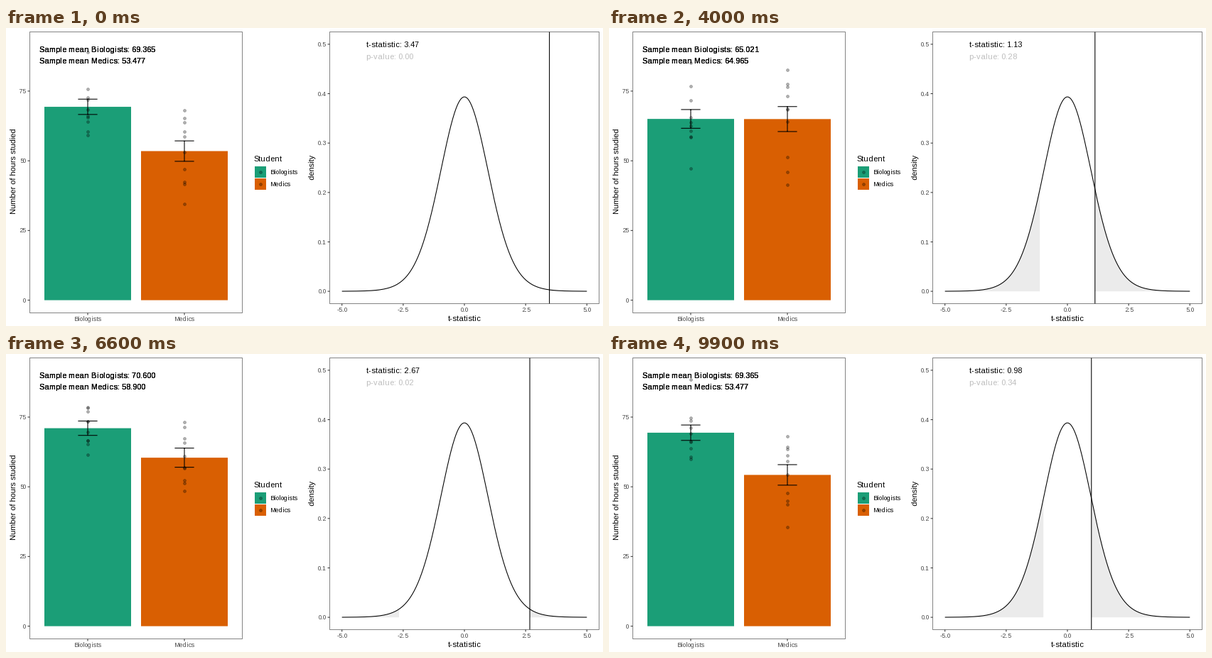
Animation, 840 px wide and 420 px high, one loop 10 s. Source, as a matplotlib script:

```python
import math

import matplotlib.pyplot as plt
import numpy as np
from matplotlib.animation import FuncAnimation
from matplotlib.patches import PathPatch, Rectangle
from matplotlib.path import Path
from matplotlib.textpath import TextPath

W, H, DPI = 840, 420, 60
PT = 72 / DPI  # points per pixel
LINE = 1.07 * PT
FONT = "Liberation Sans"
GREEN, ORANGE = "#1B9E77", "#D95F02"
DARK, TICK_TEXT = "#333333", "#4D4D4D"
NAMES = ("Biologists", "Medics")
CENTERS = (115, 251)
HALF_BAR, HALF_CAP = 61, 13.6
FRAMES, CYCLE, N = 100, 10, 10
DF = 2 * N - 2

plt.rcParams.update({
    "font.family": FONT,
    "path.snap": False,
    "text.hinting_factor": 1,
})

# Each experiment: mean of biologists, mean of medics, t-statistic
EXPERIMENTS = (
    (69.365, 53.477, 3.47), (70.412, 55.397, 3.66),
    (69.093, 54.927, 3.60), (64.600, 58.400, 1.126),
    (65.021, 64.965, 0.01), (70.238, 54.933, 4.15),
    (70.600, 58.900, 2.67), (72.272, 65.063, 1.79),
    (59.645, 59.343, 0.069), (69.950, 65.200, 0.98),
)
SE_SHARE = np.array([0.6, 0.8])  # how the groups split the standard error


def hours_y(v):
    return 383.6 - 3.929 * v


def t_x(t):
    return 645 + 34.46 * t


def density_y(d):
    return 371.1 - 696.4 * d


def t_density(t, df=DF):
    c = math.gamma((df + 1) / 2) / (math.sqrt(df * math.pi) * math.gamma(df / 2))
    return c * (1 + t * t / df) ** (-(df + 1) / 2)


def p_value(t):
    """Two-sided Welch test."""
    df = (N - 1) / np.sum(SE_SHARE ** 4)
    x = np.linspace(0, t, 400)
    d = t_density(x, df)
    return 1 - np.sum((d[1:] + d[:-1]) * np.diff(x))


def sample(rng, means, errors):
    """Random students with exactly these means and standard errors."""
    z = rng.normal(size=(2, N))
    z -= z.mean(1, keepdims=True)
    z /= z.std(1, ddof=1, keepdims=True)
    return means[:, None] + z * errors[:, None] * math.sqrt(N)


rng = np.random.default_rng(7)
MEANS = np.array([e[:2] for e in EXPERIMENTS])
T_STATS = [e[2] for e in EXPERIMENTS]
ERRORS = np.array([(b - m) / t * SE_SHARE for b, m, t in EXPERIMENTS])
POINTS = np.array([sample(rng, m, e) for m, e in zip(MEANS, ERRORS)])

fig = plt.figure(figsize=(W / DPI, H / DPI), dpi=DPI, facecolor="white")
ax = fig.add_axes([0, 0, 1, 1])
ax.set_xlim(0, W)
ax.set_ylim(H, 0)
ax.axis("off")


def text(x, y, s, size=11, color="black", ha="left"):
    return ax.text(x, y, s, fontsize=size * PT, color=color, ha=ha,
                   va="baseline", zorder=4)


def upright(x, y, s, size=11):
    """Text reading upwards, centred on y with its baseline at x."""
    path = TextPath((0, 0), s, size=size, prop={"family": FONT})
    across, up = path.vertices.T
    bottom = y + path.get_extents().width / 2
    turned = Path(np.column_stack([x - up, bottom - across]), path.codes)
    ax.add_patch(PathPatch(turned, facecolor="black", lw=0))


def line(x, y, color="black"):
    return ax.plot(x, y, color=color, lw=LINE, zorder=3, solid_capstyle="butt")[0]


def bar(x, y, w, h, color):
    return ax.add_patch(Rectangle((x, y), w, h, facecolor=color, lw=0, snap=True))


def dots(x, y):
    return ax.scatter(x, y, s=(3.9 * PT) ** 2, facecolor=(0, 0, 0, 0.3),
                      edgecolor=(0, 0, 0, 0.3), linewidth=0.71 * PT, zorder=2)


def panel(x0, y0, x1, y1):
    # The outer half of the border is clipped away
    ax.add_patch(Rectangle((x0, y0), x1 - x0, y1 - y0, fill=False,
                           edgecolor=DARK, lw=0.6 * PT, zorder=5))


def x_tick(x, y, label):
    line([x, x], [y, y + 2.9], DARK)
    text(x, y + 11.5, label, 8.8, TICK_TEXT, ha="center")


def y_tick(x, y, label):
    line([x - 2.9, x], [y, y], DARK)
    text(x - 5, y + 3.1, label, 8.8, TICK_TEXT, ha="right")


# Bar chart
panel(33.5, 5.5, 332.5, 401.5)
for v in range(0, 100, 25):
    y_tick(33.4, hours_y(v), str(v))
upright(13, 203.5, "Number of hours studied")
bars, error_bars = [], []
for cx, color, name in zip(CENTERS, (GREEN, ORANGE), NAMES):
    x_tick(cx, 401.6, name)
    bars.append(bar(cx - HALF_BAR, 0, 2 * HALF_BAR, 1, color))
    error_bars.append(line([], []))
point_x = np.repeat(CENTERS, N)
points = dots(point_x, np.zeros(2 * N))
# Overprinting thickens these labels
mean_labels = [[text(47, y, "") for _ in range(3)] for y in (34, 50)]

# Legend
text(348, 188, "Student")
for y, color, name in zip((195, 212), (GREEN, ORANGE), NAMES):
    bar(350, y, 16, 16, color)
    dots([358], [y + 8])
    text(372, y + 11, name, 8.8)

# Density chart
panel(455.5, 5.5, 834.5, 388.5)
for i in range(6):
    y_tick(455.5, density_y(i / 10), f"{i / 10:.1f}")
for t in np.linspace(-5, 5, 5):
    x_tick(t_x(t), 388.5, f"{t:.1f}")
upright(433, 197.5, "density")
text(645, 412.6, "t-statistic", ha="center")
grid = np.linspace(-5, 5, 401)
line(t_x(grid), density_y(t_density(grid)))
tails = [ax.fill([0, 0, 0], [0, 0, 0], color="#EBEBEB", lw=0, zorder=1)[0]
         for _ in range(2)]
marker = line([], [])
t_label = text(507, 27, "")
p_label = text(507, 44, "", color="#BEBEBE")


def progress(frame):
    """Current experiment and the eased way to the next one."""
    k = frame // CYCLE
    start = 4 if k else 3  # the opening hold is one frame shorter
    p = max(0, (frame % CYCLE - start) / (CYCLE - start))
    return k, 0.5 - 0.5 * math.cos(math.pi * p)


def draw_bars(frame):
    k, e = progress(frame)
    nxt = (k + 1) % len(EXPERIMENTS)

    def blend(values):
        return (1 - e) * values[k] + e * values[nxt]

    points.set_offsets(np.column_stack([point_x, hours_y(blend(POINTS)).ravel()]))
    columns = zip(CENTERS, bars, error_bars, blend(MEANS), blend(ERRORS))
    for cx, column, whisker, mean, se in columns:
        top = hours_y(mean)
        column.set_y(top)
        column.set_height(hours_y(0) - top)
        hi, lo = hours_y(mean + se), hours_y(mean - se)
        left, right = cx - HALF_CAP, cx + HALF_CAP
        whisker.set_data([left, right, np.nan, cx, cx, np.nan, left, right],
                         [hi, hi, np.nan, hi, lo, np.nan, lo, lo])
    shown = MEANS[nxt if e > 0.5 + 1e-9 else k]
    for name, mean, copies in zip(NAMES, shown, mean_labels):
        for label in copies:
            label.set_text(f"Sample mean {name}: {mean:.3f}")


def draw_density(frame):
    t = T_STATS[max(0, frame - 1) // CYCLE]
    marker.set_data([t_x(t)] * 2, [5.5, 388.5])
    xs = np.linspace(t, 5, 200)
    ys = density_y(np.r_[0, t_density(xs), 0])
    for side, tail in zip((-1, 1), tails):
        tail.set_xy(np.column_stack([t_x(side * np.r_[t, xs, 5]), ys]))
    t_label.set_text(f"t-statistic: {t:.2f}")
    p_label.set_text(f"p-value: {p_value(t):.2f}")


def update(frame):
    draw_bars(frame)
    draw_density(frame)
    return []


anim = FuncAnimation(fig, update, frames=FRAMES, interval=100,
                     init_func=lambda: update(0), repeat=True, repeat_delay=0)
plt.show()
```
